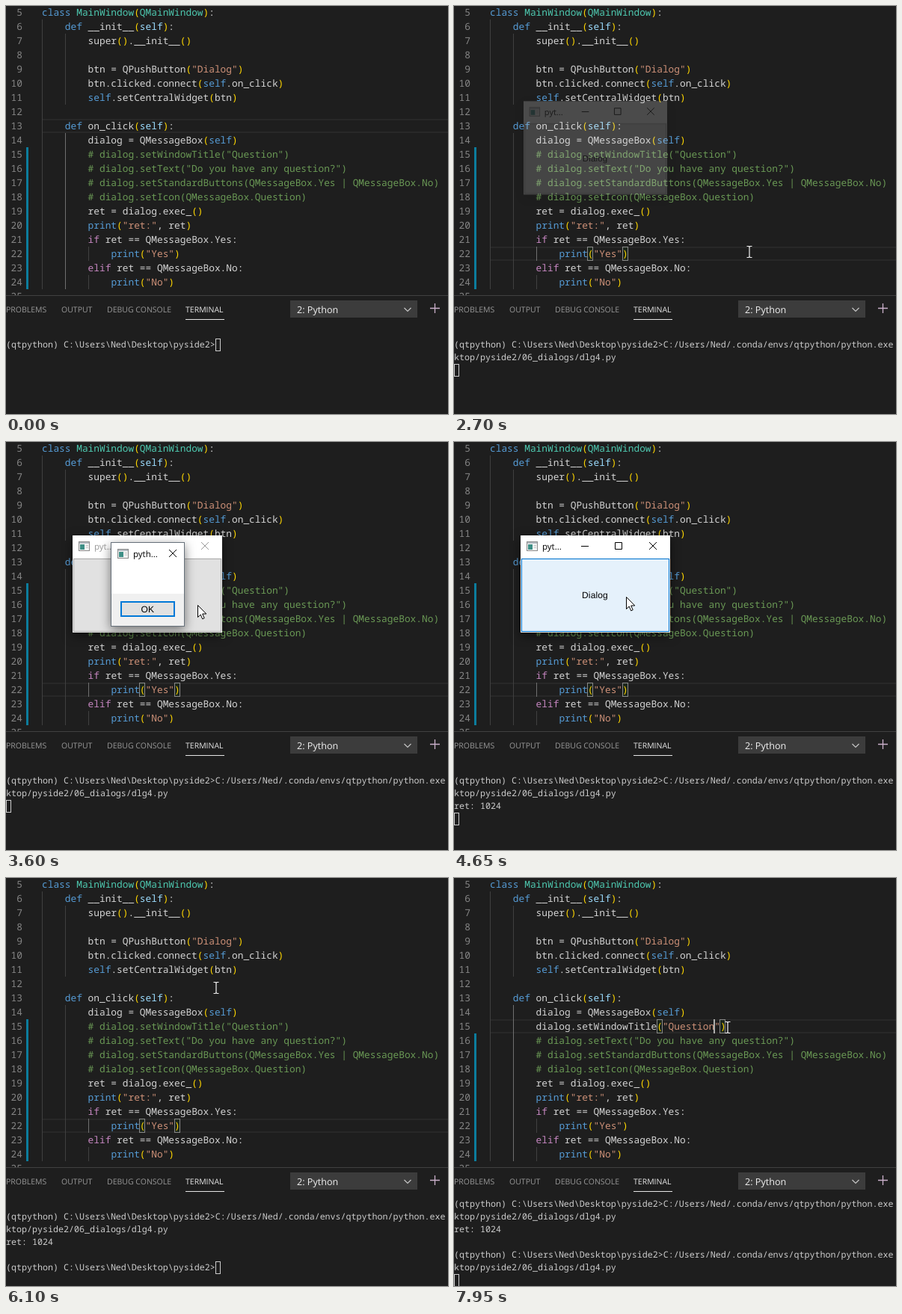
Animation, 591 px wide and 546 px high, one loop 8000 ms. Source, as an HTML page:

```html
<!DOCTYPE html>
<html lang="en">
<head>
<meta charset="utf-8">
<title>Editor and dialog</title>
<style>
html, body { margin: 0; width: 100%; height: 100%; overflow: hidden; background: #1e1e1e; }
svg { display: block; width: 591px; height: 546px; }
text { white-space: pre; text-rendering: geometricPrecision; }
.code { font: 12.83px "Noto Sans Mono", monospace; fill: #d4d4d4; }
.term { font: 11.667px "Noto Sans Mono", monospace; fill: #ccc; }
.tab { font: 10.5px "Open Sans", sans-serif; fill: #979797; }
.title { font: 11.5px "Open Sans", sans-serif; }
.label { font: 12px "Liberation Sans", Arial, sans-serif; fill: #000; letter-spacing: .15px; }
.shadow { filter: drop-shadow(0 4px 7px rgba(0, 0, 0, .5)); }
.line { fill: none; stroke: #000; }
</style>
</head>
<body>
<svg viewBox="0 0 591 546">
  <defs>
    <g id="appIcon">
      <rect x=".5" y=".5" width="14" height="12" fill="#f4f4f4" stroke="#8a8a8a"/>
      <path d="M1 1H14V3H1Z" fill="#b5bcc2"/>
      <path d="M2 4H8V11H2Z" fill="#3f8f86"/>
      <path d="M9.5 5.5H13M9.5 8H13" stroke="#c4c4c4"/>
    </g>
  </defs>
  <rect width="591" height="546" fill="#1e1e1e"/>
  <g id="row" fill="#282828">
    <rect x="48" width="543" height="2"/><rect x="48" y="17" width="543" height="2"/>
  </g>
  <g id="guides" fill="#404040"></g>
  <rect id="activeGuide" width="1" fill="#707070"/>
  <g id="words" fill="#45494a">
    <rect x="302" y="189" width="62" height="19"/><rect x="333" y="246" width="61" height="19"/>
  </g>
  <g id="brackets" fill="#006400" fill-opacity=".1" stroke="#888">
    <rect width="7" height="18"/><rect width="7" height="18"/>
  </g>
  <rect id="gutter" x="27" width="3" fill="#0c7d9d"/>
  <g id="code" class="code"></g>
  <rect id="caret" width="2" height="19" fill="#aeafad"/>

  <rect y="387" width="591" height="159" fill="#1e1e1e"/>
  <rect y="387" width="591" height="1" fill="#414141"/>
  <g class="tab">
    <text x="0" y="410">PROBLEMS</text>
    <text x="74" y="410">OUTPUT</text>
    <text x="135" y="410">DEBUG CONSOLE</text>
    <text x="240" y="410" fill="#e7e7e7" style="fill:#e7e7e7">TERMINAL</text>
  </g>
  <rect x="240" y="419" width="52" height="1" fill="#e7e7e7"/>
  <rect x="380" y="394" width="170" height="23" fill="#3c3c3c"/>
  <text x="389" y="411" font-size="12.6" font-family="Open Sans, sans-serif" fill="#f0f0f0">2: Python</text>
  <path d="M532.5 404L537 408.5L541.5 404" fill="none" stroke="#c5c5c5" stroke-width="1.2"/>
  <path d="M567 404.5H580M573.5 398V411" stroke="#cbb0cb" stroke-width="1.3"/>
  <g id="term" class="term"></g>
  <rect id="block" width="6" height="16" fill="none" stroke="#ccc"/>

  <g id="win" class="shadow">
    <rect x="89" y="125" width="200" height="130" fill="#f0f0f0"/>
    <rect x="89" y="125" width="200" height="30" fill="#fff"/>
    <use href="#appIcon" x="97" y="133"/>
    <text id="winTitle" class="title" x="118" y="144">pyt...</text>
    <rect id="closeBox" x="244" y="125" width="45" height="29"/>
    <path id="winIcons" class="line" d="M170 139.5H180M215.5 134.5H224.5V143.5H215.5Z"/>
    <path id="closeX" class="line" d="M261 134L271 144M271 134L261 144"/>
    <rect id="btn" x="90.5" y="156.5" width="197" height="97"/>
    <text class="label" x="171" y="209">Dialog</text>
  </g>
  <g id="dlg" class="shadow">
    <rect x="140.5" y="134.5" width="98" height="112" fill="#fff" stroke="#66707a"/>
    <rect x="141" y="203" width="97" height="43" fill="#f0f0f0"/>
    <use href="#appIcon" x="149" y="143"/>
    <text class="title" x="170" y="154">pyth...</text>
    <path class="line" d="M218 144L228 154M228 144L218 154"/>
    <rect id="ok" x="154" y="214" width="71" height="19" stroke="#0078d7" stroke-width="2"/>
    <text class="label" x="180.5" y="228">OK</text>
  </g>

  <circle id="press" r="12" fill="#ffd21e" fill-opacity=".65"/>
  <path id="beam" d="M-3.5-7.5H-1L0-6.5L1-7.5H3.5M0-6.5V6.5M-3.5 7.5H-1L0 6.5L1 7.5H3.5" fill="none" stroke="#f2f2f2" stroke-width="1.2"/>
  <path id="arrow" d="M.5.5V16.5L4.2 13L6.7 18.8L9.2 17.7L6.7 12H11.8Z" fill="#fff" stroke="#000"/>
</svg>
<script>
const LOOP = 8000, TICK = 50, COL = 7.698, LEFT = 48;
const $ = id => document.getElementById(id);
const colX = c => LEFT + c * COL;
const rowY = n => (n - 5) * 19 - 1;

function add(parent, name, attrs, text) {
  const el = document.createElementNS('http://www.w3.org/2000/svg', name);
  set(el, attrs);
  if (text !== undefined) el.textContent = text;
  return parent.appendChild(el);
}
function set(el, attrs) {
  for (const k in attrs) el.setAttribute(k, attrs[k]);
}
const show = (el, on) => { el.style.display = on ? '' : 'none'; };

// Editor
const source = `class MainWindow(QMainWindow):
    def __init__(self):
        super().__init__()

        btn = QPushButton("Dialog")
        btn.clicked.connect(self.on_click)
        self.setCentralWidget(btn)

    def on_click(self):
        dialog = QMessageBox(self)
        # dialog.setWindowTitle("Question")
        # dialog.setText("Do you have any question?")
        # dialog.setStandardButtons(QMessageBox.Yes | QMessageBox.No)
        # dialog.setIcon(QMessageBox.Question)
        ret = dialog.exec_()
        print("ret:", ret)
        if ret == QMessageBox.Yes:
            print("Yes")
        elif ret == QMessageBox.No:
            print("No")`.split('\n');

const syntax = /(#.*)|("[^"]*")|\b(class|def|print)\b|\b(if|elif)\b|(?<=def \w+\()(self)|\b(self)\b|\b(Q?MainWindow)\b|([()])/g;
const colors = ['#6a9955', '#ce9178', '#569cd6', '#c586c0', '#9cdcfe', '#569cd6', '#4ec9b0', '#ffd700'];

function codeLine(line, n) {
  const indent = line.search(/\S/);
  if (indent < 0) return;
  const el = add($('code'), 'text', { x: colX(indent), y: rowY(n) + 14 });
  const body = line.trim();
  let pos = 0;
  for (const m of body.matchAll(syntax)) {
    if (m.index > pos) add(el, 'tspan', {}, body.slice(pos, m.index));
    const kind = m.slice(1).findIndex(g => g !== undefined);
    add(el, 'tspan', { fill: colors[kind] }, m[0]);
    pos = m.index + m[0].length;
  }
  if (pos < body.length) add(el, 'tspan', {}, body.slice(pos));
  return el;
}
const lines = source.map((line, i) => codeLine(line, i + 5));
const commented = lines[10];
const active = codeLine(source[10].replace('# ', ''), 15);

for (let n = 5; n <= 25; n++)
  add($('code'), 'text', { x: 22, y: rowY(n) + 14, 'text-anchor': 'end', fill: '#858585' }, n);

// column, first line, last line
for (const [c, a, b] of [[0, 6, 24], [4, 7, 11], [4, 14, 24], [8, 22, 22], [8, 24, 24]])
  add($('guides'), 'rect', { x: Math.round(colX(c)), y: rowY(a), width: 1, height: (b - a + 1) * 19 });

// Terminal
const prompt = '(qtpython) C:\\Users\\Ned\\Desktop\\pyside2>';
const run = [prompt + 'C:/Users/Ned/.conda/envs/qtpython/python.exe', 'ktop/pyside2/06_dialogs/dlg4.py'];
const ret = 'ret: 1024';
const screens = [
  [0, [prompt]],
  [2100, [...run, '']],
  [4300, [...run, ret, '']],
  [5900, [...run, ret, '', prompt]],
  [7600, [...run, ret, '', ...run, '']]
];
const termRows = Array.from({ length: 7 }, () => add($('term'), 'text', { x: 0 }, ''));
let shown;
function drawTerm(rows) {
  if (rows === shown) return;
  shown = rows;
  const top = 445 - 17 * Math.max(0, rows.length - 6);
  termRows.forEach((el, i) => {
    el.textContent = rows[i] || '';
    el.setAttribute('y', top + 17 * i + 12);
  });
  const last = rows.length - 1;
  set($('block'), { x: rows[last].length * 7 + .5, y: top + 17 * last + .5 });
}

// Timeline
const path = [
  [350, 498, 550], [900, 395, 329], [3000, 395, 329], [3350, 256, 218], [3750, 256, 218],
  [4050, 213, 229], [4500, 213, 229], [4950, 278, 145], [6050, 278, 145], [6500, 366, 200]
];
const clicks = [[1150, 1250], [3400, 3500], [4150, 4250], [5750, 5850], [6600, 6700]];
// from, to, x, line
const carets = [
  [1200, 1500, 232, 22], [1750, 2100, 232, 22], [2400, 2700, 232, 22],
  [6650, 6950, 363, 15], [7250, 7650, 347, 15], [7950, 8000, 347, 15]
];
const fade = (open, close) => [
  [0, 0], [open, .2], [open + 50, .55], [open + 100, .85], [open + 150, 1],
  [close, .6], [close + 50, .2], [close + 100, 0]
];
const winFade = fade(2700, 5850), dlgFade = fade(3450, 4250);

const step = (t, list) => list.filter(s => s[0] <= t).pop()[1];
const during = (t, list) => list.find(s => t >= s[0] && t < s[1]);

function pointer(t) {
  const i = path.findIndex(p => p[0] > t);
  if (i < 0) return path[path.length - 1].slice(1);
  if (i === 0) return path[0].slice(1);
  const [t0, x0, y0] = path[i - 1], [t1, x1, y1] = path[i];
  const u = (t - t0) / (t1 - t0), e = u * u * (3 - 2 * u);
  return [x0 + (x1 - x0) * e, y0 + (y1 - y0) * e];
}

function popup(el, alpha, cx, cy) {
  show(el, alpha > 0);
  const s = .95 + .05 * alpha;
  set(el, { opacity: alpha, transform: `translate(${cx} ${cy}) scale(${s}) translate(${-cx} ${-cy})` });
}

function drawEditor(t) {
  const line = t < 1150 ? 13 : t < 6600 ? 22 : 15;
  set($('row'), { transform: `translate(0 ${rowY(line)})` });
  set($('activeGuide'), line === 22
    ? { x: 110, y: rowY(22), height: 19 }
    : { x: 79, y: rowY(14), height: 209 });

  const edited = t >= 7250;
  show(commented, !edited);
  show(active, edited);
  show($('words'), t >= 6800 && !edited);
  const top = rowY(t < 7400 ? 15 : 16);
  set($('gutter'), { y: top, height: 379 - top });

  const pair = during(t, [[1200, 6600, 17, 23, 22], [7350, LOOP, 29, 40, 15]]);
  show($('brackets'), pair);
  if (pair) [...$('brackets').children].forEach((el, i) =>
    set(el, { x: Math.floor(colX(pair[2 + i])) + .5, y: rowY(pair[4]) + .5 }));

  const caret = during(t, carets);
  show($('caret'), caret);
  if (caret) set($('caret'), { x: caret[2], y: rowY(caret[3]) });
}

function drawWindows(t, x, y, pressed) {
  const open = step(t, winFade), modal = step(t, dlgFade);
  popup($('win'), open, 189, 190);
  popup($('dlg'), modal, 189.5, 190.5);

  const inside = open > 0 && x > 89 && x < 289 && y > 125 && y < 255;
  const idle = modal > 0;
  const onBtn = inside && !idle && y > 155;
  const onClose = inside && !idle && x > 244 && y < 154;
  const onOk = idle && x > 153 && x < 226 && y > 213 && y < 234;
  const ink = idle ? '#999' : '#000';
  set($('winTitle'), { fill: ink });
  $('winIcons').style.stroke = ink;
  $('closeX').style.stroke = onClose ? '#fff' : ink;
  set($('closeBox'), { fill: onClose ? (t >= 5750 ? '#f1707a' : '#e81123') : '#fff' });
  set($('btn'), {
    fill: onBtn ? (pressed ? '#cce4f7' : '#e5f1fb') : '#e1e1e1',
    stroke: onBtn ? '#0078d7' : '#adadad'
  });
  set($('ok'), { fill: onOk ? (pressed ? '#cce4f7' : '#e5f1fb') : '#e1e1e1' });
  return inside;
}

function draw(t) {
  const [x, y] = pointer(t), pressed = during(t, clicks);
  drawEditor(t);
  drawTerm(step(t, screens));
  const inside = drawWindows(t, x, y, pressed);
  const place = { transform: `translate(${Math.round(x)} ${Math.round(y)})` };
  for (const id of ['press', 'beam', 'arrow']) set($(id), place);
  show($('press'), pressed);
  show($('arrow'), inside);
  show($('beam'), !inside && t >= 400);
}

const start = performance.now();
function frame() {
  const t = (performance.now() - start) % LOOP;
  draw(Math.floor(t / TICK) * TICK);
  requestAnimationFrame(frame);
}
frame();
</script>
</body>
</html>
```
